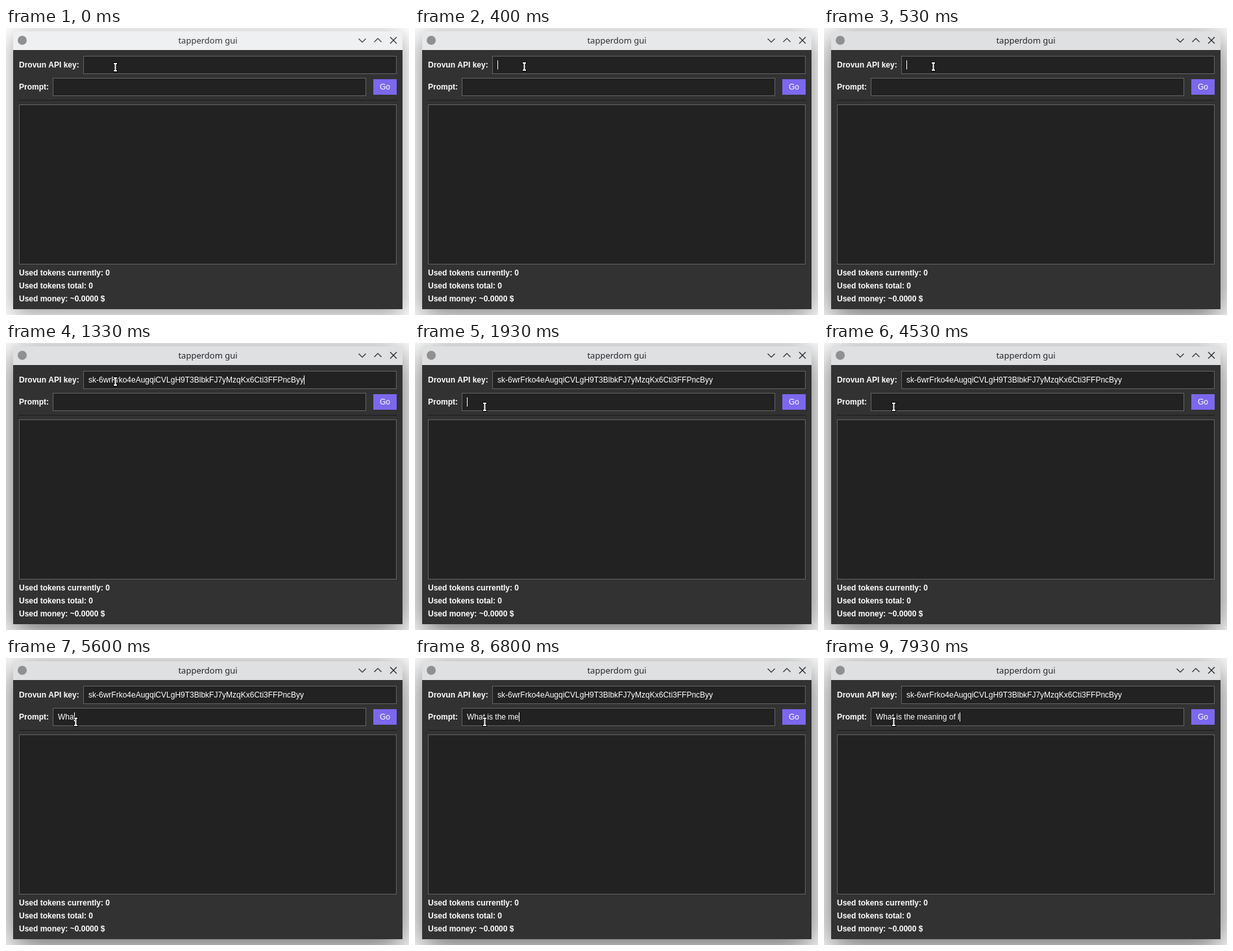
Recreate the animation shown at these times as an HTML page with a canvas. Size 621 by 443 pixels, loop 8000 ms.

```html
<!DOCTYPE html>
<html lang="en">
<head>
<meta charset="utf-8">
<title>tapperdom gui</title>
<style>
  html, body { margin: 0; width: 100%; height: 100%; overflow: hidden; background: #fff; }
  canvas { display: block; }
</style>
</head>
<body>
<canvas id="stage" width="621" height="443"></canvas>
<script>
const ctx = document.getElementById('stage').getContext('2d');
const W = 621, H = 443, LOOP = 8000;
const SANS = '12px "Liberation Sans", Arial, sans-serif';
const BOLD = 'bold ' + SANS;
const TITLE = '13px "Noto Sans", sans-serif';

const KEY = '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';
const PROMPT = 'What is the meaning of l';
const PASTE = 1270, FOCUS = 400, SWITCH = 1930;

// When each character of the prompt is typed
const KEYS = [
  5270, 5530, 5600, 5800, 5870,
  6070, 6130, 6200,
  6400, 6470, 6530, 6600, 6730, 6800,
  7000, 7000, 7200, 7270, 7400, 7470,
  7670, 7730, 7870, 7930
];
const BLINKS = [2470, 2930, 3470, 4000, 4530, 5070];
const MOVES = [1470, 1530, 1600, 1670, 1730];

const passed = (times, t) => times.filter(at => t >= at).length;
const mix = (a, b, k) => a + (b - a) * k;
const rgb = (from, to, k) => `rgb(${from.map((v, i) => Math.round(mix(v, to[i], k)))})`;

function rect(x, y, w, h, color) {
  ctx.fillStyle = color;
  ctx.fillRect(x, y, w, h);
}

function text(str, x, y, font = SANS, color = '#fff') {
  ctx.font = font;
  ctx.fillStyle = color;
  ctx.fillText(str, x, y);
}

function line(points, color, width) {
  ctx.strokeStyle = color;
  ctx.lineWidth = width;
  ctx.beginPath();
  points.forEach(([x, y], i) => i ? ctx.lineTo(x, y) : ctx.moveTo(x, y));
  ctx.stroke();
}

function field(x, y, w, h) {
  rect(x, y, w, h, '#646464');
  rect(x + 1, y + 1, w - 2, h - 2, '#222');
}

function caret(x, y) {
  rect(Math.round(x), y, 1, 14, '#fff');
}

function windowFrame(active) {
  rect(0, 0, W, H, '#fff');
  ctx.save();
  ctx.shadowColor = `rgba(0,0,0,${mix(0.4, 0.62, active)})`;
  ctx.shadowBlur = mix(34, 48, active);
  ctx.shadowOffsetY = mix(8, 11, active);
  ctx.fillStyle = rgb([239, 240, 241], [222, 224, 226], active);
  ctx.beginPath();
  ctx.roundRect(11, 5, 600, 429, [4, 4, 0, 0]);
  ctx.fill();
  ctx.restore();
  rect(11, 34, 600, 400, '#323232');
}

function titleBar(active) {
  const ink = rgb([52, 55, 58], [35, 38, 41], active);
  ctx.fillStyle = '#909090';
  ctx.beginPath();
  ctx.arc(25, 19, 7, 0, Math.PI * 2);
  ctx.fill();
  ctx.textAlign = 'center';
  text('tapperdom gui', 311, 24, TITLE, ink);
  ctx.textAlign = 'left';
  line([[543.5, 16.5], [549, 22], [554.5, 16.5]], ink, 1.2);
  line([[567.5, 21.5], [573, 16], [578.5, 21.5]], ink, 1.2);
  line([[592, 14], [602, 24]], ink, 1.2);
  line([[602, 14], [592, 24]], ink, 1.2);
}

function form() {
  text('Drovun API key:', 20, 61, BOLD);
  field(119, 43, 483, 28);
  text('Prompt:', 20, 95, BOLD);
  field(72, 77, 483, 28);
  rect(566, 79, 36, 24, '#7b68ee');
  text('Go', 576, 95);
  rect(20, 111, 582, 1, '#1c1c1c');
  field(20, 118, 582, 247);
  text('Used tokens currently: 0', 20, 382, BOLD);
  text('Used tokens total: 0', 20, 402, BOLD);
  text('Used money: ~0.0000 $', 20, 422, BOLD);
}

function keyEntry(t) {
  const value = t >= PASTE ? KEY : '';
  text(value, 127, 61);
  const lit = t >= FOCUS && t < SWITCH && !(t >= 870 && t < PASTE);
  if (lit) caret(127 + ctx.measureText(value).width, 50);
}

function promptEntry(t) {
  const value = PROMPT.slice(0, passed(KEYS, t));
  text(value, 80, 95);
  if (t >= SWITCH && passed(BLINKS, t) % 2 === 0) {
    caret(80 + ctx.measureText(value).width, 84);
  }
}

function pointer(t) {
  const step = passed(MOVES, t) / MOVES.length;
  const k = step * step * (3 - 2 * step);
  const x = Math.round(mix(168, 107, k));
  const y = Math.round(mix(t < 200 ? 60 : 59, 98, k));
  rect(x - 3, y - 7, 7, 4, '#000');
  rect(x - 3, y + 4, 7, 4, '#000');
  rect(x - 1, y - 5, 3, 11, '#000');
  rect(x - 2, y - 6, 5, 2, '#fff');
  rect(x - 2, y + 5, 5, 2, '#fff');
  rect(x - 0.5, y - 5, 2, 11, '#fff');
}

function draw(t) {
  const active = t < FOCUS ? 0 : t < 530 ? 0.5 : 1;
  windowFrame(active);
  titleBar(active);
  form();
  keyEntry(t);
  promptEntry(t);
  pointer(t);
}

const start = performance.now();
function tick() {
  draw((performance.now() - start) % LOOP);
  requestAnimationFrame(tick);
}
tick();
</script>
</body>
</html>
```
